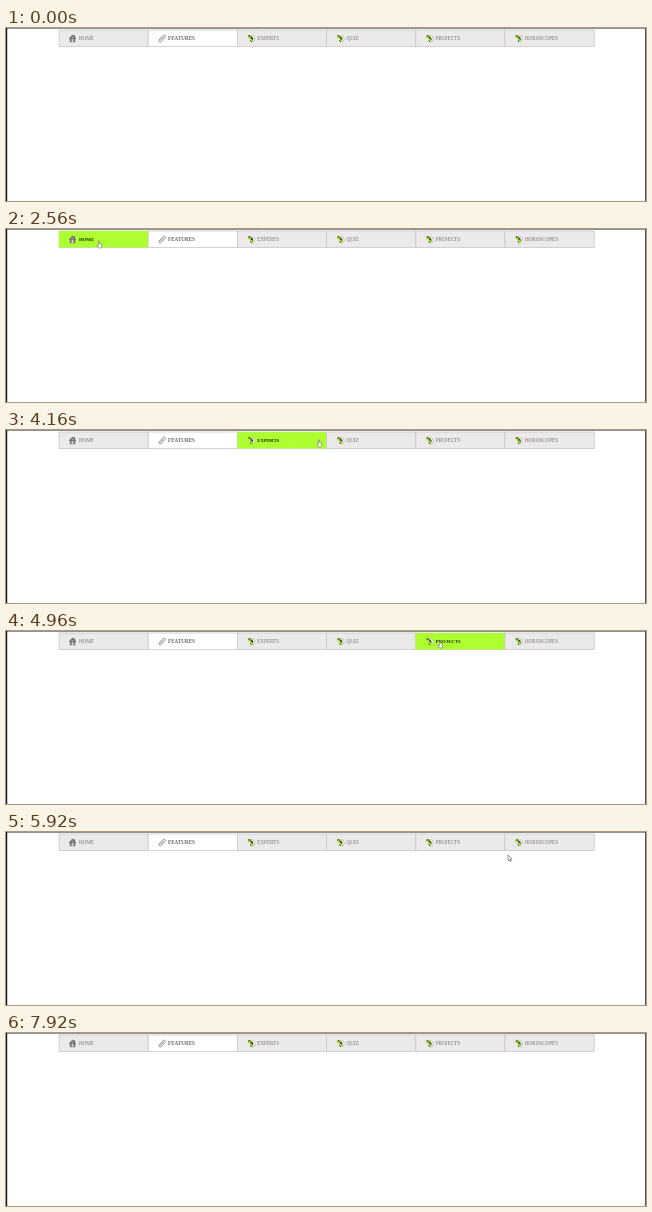
An HTML page for the animation above (8000 ms loop, 640x173 px).

```html
<!DOCTYPE html>
<html lang="en">
<head>
<meta charset="utf-8">
<title>Menu hover</title>
<style>
  html, body { margin: 0; width: 100%; height: 100%; overflow: hidden; background: #fff; }
  svg { display: block; width: 640px; height: 173px; }
  text { font: 5.1px "Liberation Serif", serif; fill: #777476; }
  .tab rect { fill: #ece9ea; stroke: #cbc7c9; stroke-width: .8; }
  .tab.active rect { fill: #fff; }
  .tab.active text { font-weight: bold; fill: #666; }
  .tab.hover rect { fill: #adff2f; stroke: #b9e67a; }
  .tab.hover text { fill: #1c2608; font-weight: bold; font-size: 4.8px; }
</style>
</head>
<body>
<svg viewBox="0 0 640 173">
  <defs>
    <g id="home">
      <path d="M0 4 3.5 .3 5 1.8V.8h1v2L7 4v.7H6.3V8H.8V4.7H0z" fill="#777276"/>
      <path d="M2.6 4.6h1.8V8H2.6zM2.6 2.7h1.6v.8H2.6z" fill="#d5d0d3"/>
    </g>
    <g id="clip" fill="none" stroke="#8b8b8b" stroke-width=".9" stroke-linecap="round">
      <path d="M1.3 5.2 4.9 1.3Q6.2.2 7 1.3 7.6 2.2 6.7 3.2L3.2 7.1Q1.9 8.2.9 7.2.2 6.3 1.3 5.2M2.4 5.9 5.4 2.6"/>
    </g>
    <g id="bug">
      <path d="M3.2 1.2 6.4 1.8 7.6 5 6 7.5 3.6 7z" fill="#fff" stroke="#8a8a8a" stroke-width=".5"/>
      <path d="M.6 1.7Q2.2.3 4.3 1.5L3.3 4.4 1 4.1zM3 5.2 5.9 4.8 5.6 7.4 3.3 7.4z" fill="#a6ee22"/>
      <path d="M.7 2 2.3 1.1M2.5 2.3 4.6 3.2 3.9 4.6M4.9 3.3 5.3 5.5M2.8 6.2 4.1 7.3" fill="none" stroke="#18200d" stroke-width="1"/>
    </g>
    <path id="arrow" d="M0 0V5.7L1.3 4.5 2.2 6.6 3.2 6.2 2.3 4.2H4z" fill="#fff" stroke="#555" stroke-width=".6"/>
    <path id="hand" d="M-.6 0Q0-.7.6 0V2.5L2.7 3V5L2 7H-.5L-2 4.4-1.6 3.8-.6 4.5z" fill="#fff" stroke="#555" stroke-width=".5"/>
  </defs>
  <g id="menu"></g>
  <path d="M0 .5H640" stroke="#929292"/>
  <path d="M639.5 0V173" stroke="#555"/>
  <path d="M.6 0V173" stroke="#111" stroke-width="1.2"/>
  <use id="cursor"/>
</svg>
<script>
const LOOP = 8000, STEP = 80;
const LEFT = 53, TOP = 2, WIDTH = 89.2, HEIGHT = 16.5;
const tabs = [
  ["HOME", "home"], ["FEATURES", "clip"], ["EXPERTS", "bug"],
  ["QUIZ", "bug"], ["PROJECTS", "bug"], ["HOROSCOPES", "bug"]
];

// time, x, y of the pointer tip
const path = [
  [1520, -1, 16], [1760, 22, 58], [1920, 45, 78], [2160, 78, 46],
  [2320, 90, 21], [2400, 92, 15], [2560, 93, 12], [2800, 116, 12],
  [3200, 176, 11], [3600, 238, 11], [4160, 313, 10], [4400, 345, 11],
  [4960, 434, 10], [5280, 501, 11], [5520, 529, 11], [5760, 509, 17],
  [5920, 502, 23], [6080, 506, 75], [6240, 511, 143]
];

const make = (name, attrs, parent) => {
  const node = document.createElementNS("http://www.w3.org/2000/svg", name);
  for (const key in attrs) node.setAttribute(key, attrs[key]);
  return parent.appendChild(node);
};

const menu = document.getElementById("menu");
const cursor = document.getElementById("cursor");
const nodes = tabs.map(([label, icon], i) => {
  const x = LEFT + i * WIDTH;
  const tab = make("g", { class: i === 1 ? "tab active" : "tab" }, menu);
  make("rect", { x, y: TOP, width: WIDTH, height: HEIGHT }, tab);
  make("use", { href: "#" + icon, x: x + 10, y: 6.3 }, tab);
  make("text", { x: x + 19.9, y: 12.3 }, tab).textContent = label;
  return tab;
});

function pointerAt(time) {
  const next = path.findIndex(key => key[0] > time);
  if (next < 1) return null;
  const [t0, x0, y0] = path[next - 1], [t1, x1, y1] = path[next];
  const k = (time - t0) / (t1 - t0);
  return { x: x0 + (x1 - x0) * k, y: y0 + (y1 - y0) * k };
}

function draw(now) {
  const time = Math.floor((now % LOOP) / STEP) * STEP;
  const point = pointerAt(time);
  const inside = point && point.y > TOP && point.y < TOP + HEIGHT;
  const hovered = inside ? Math.floor((point.x - LEFT) / WIDTH) : -1;
  nodes.forEach((node, i) => node.classList.toggle("hover", i === hovered));
  cursor.style.display = point ? "" : "none";
  if (point) {
    cursor.setAttribute("href", hovered >= 0 ? "#hand" : "#arrow");
    cursor.setAttribute("transform", `translate(${point.x} ${point.y})`);
  }
}

const start = performance.now();
function tick() {
  draw(performance.now() - start);
  requestAnimationFrame(tick);
}
tick();
</script>
</body>
</html>
```
